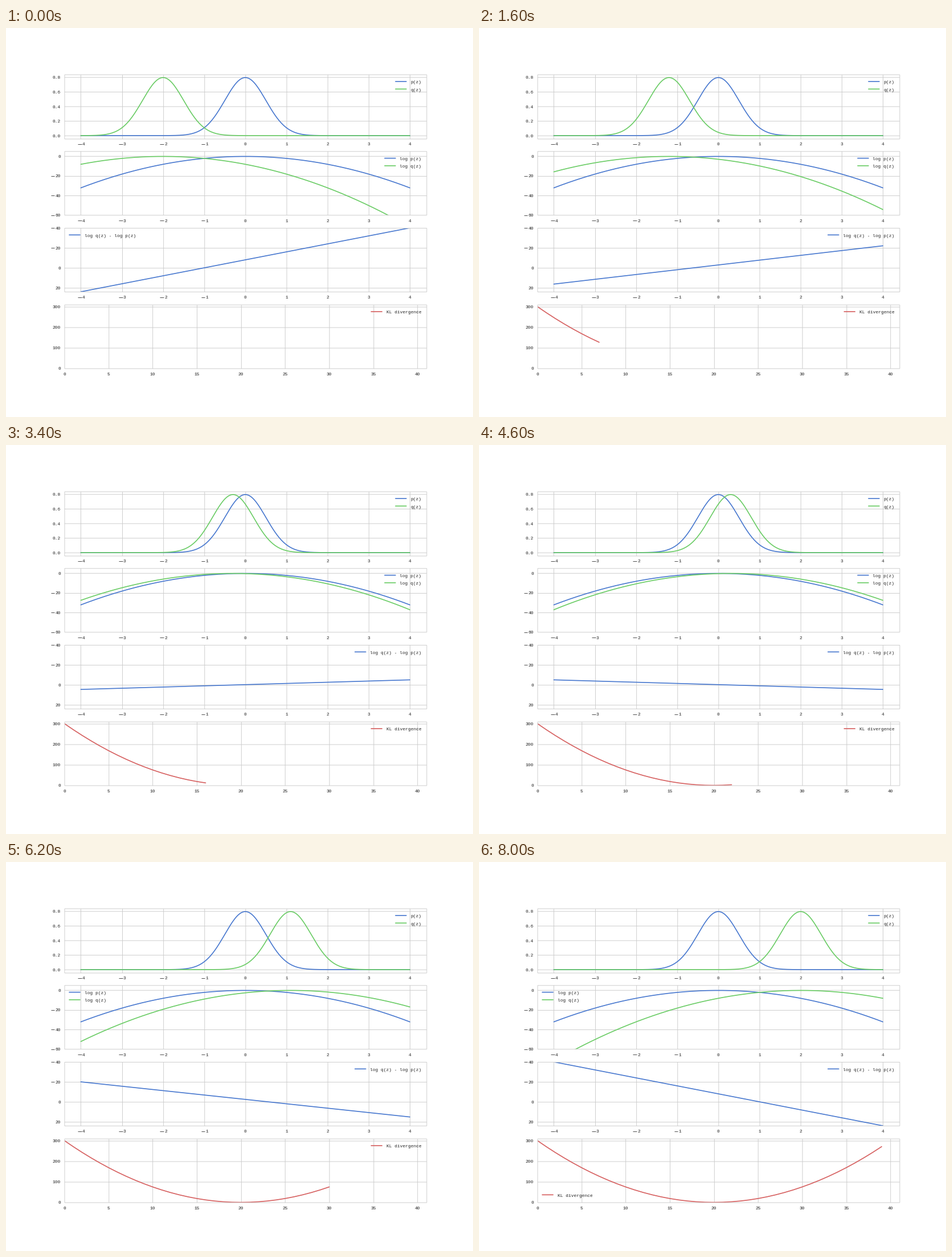
A matplotlib script that plays this animation: 820x683 px, repeating every 8.2 s.

```python
import numpy as np
import matplotlib.pyplot as plt
from matplotlib.animation import FuncAnimation
from matplotlib.lines import Line2D
from matplotlib.transforms import Affine2D

STAGE_W, STAGE_H, DPI = 820, 683, 64
# Layout units: a 12 x 10 inch page at 72 units per inch, y pointing down.
W, H = 864, 720
UNIT = STAGE_W / W * 72 / DPI      # points per layout unit
EM, CHAR = 10, 5                   # type size and character width
LEFT, RIGHT, TOP = 0.125 * W, 0.9 * W, 0.12 * H
PANEL = 0.755 * H / 4.6            # panel height; gaps are 20 % of it
BLUE, GREEN, RED = "#4878CF", "#6ACC65", "#D65F5F"
INK, GRID = "0.15", "0.8"
STEPS, INTERVAL = 41, 200
SIGMA = 0.5

plt.rcParams.update({
    "font.family": "Liberation Mono",
    "font.size": CHAR / 0.6 * UNIT,
    "text.color": INK,
    "lines.linewidth": 1.75 * UNIT,
    "lines.solid_capstyle": "round",
})

fig = plt.figure(figsize=(STAGE_W / DPI, STAGE_H / DPI), dpi=DPI,
                 facecolor="white")
page = Affine2D().scale(1 / W, -1 / H).translate(0, 1) + fig.transFigure


def text(x, y, s):
    return fig.text(x, y, s, transform=page, ha="left", va="baseline")


def stroke(x0, x1, y, **style):
    return fig.add_artist(Line2D([x0, x1], [y, y], transform=page, **style))


def number(x, y, value, fmt, align):
    """Tick label with a full-width minus; align is the share left of x."""
    digits = format(abs(value), fmt)
    sign = EM if value < 0 else 0
    x -= align * (sign + CHAR * len(digits))
    if sign:
        stroke(x + 0.18 * EM, x + 0.88 * EM, y - 2.8, color=INK,
               lw=0.85 * UNIT, solid_capstyle="butt")
    text(x + sign, y, digits)


def panel_top(row):
    return TOP + 1.2 * PANEL * row


def snap(v):
    return np.floor(v + 0.5) + 0.5


def rules(ax, places, edges, span, vertical):
    """Grid lines below the curves, frame lines above them."""
    edges = {snap(v) for v in edges}
    for v in {snap(v) for v in places} | edges:
        xy = ([v, v], span) if vertical else (span, [v, v])
        ax.add_artist(Line2D(*xy, transform=page, color=GRID, lw=UNIT,
                             snap=False, solid_capstyle="butt", clip_on=False,
                             zorder=2.5 if v in edges else 0.5))


def panel(row, xlim, ylim, xticks, yticks, fmt="d"):
    top = panel_top(row)
    bottom = top + PANEL
    ax = fig.add_axes([LEFT / W, 1 - bottom / H, (RIGHT - LEFT) / W, PANEL / H])
    ax.set(xlim=xlim, ylim=ylim)
    ax.set_axis_off()
    xs = [LEFT + (RIGHT - LEFT) * (v - xlim[0]) / (xlim[1] - xlim[0])
          for v in xticks]
    ys = [bottom - PANEL * (v - ylim[0]) / (ylim[1] - ylim[0]) for v in yticks]
    rules(ax, xs, (LEFT, RIGHT), (snap(top), snap(bottom)), True)
    rules(ax, ys, (top, bottom), (snap(LEFT), snap(RIGHT)), False)
    for x, v in zip(xs, xticks):
        number(x, bottom + 12.8, v, "d", 0.5)
    for y, v in zip(ys, yticks):
        number(LEFT - 7, y + 2.8, v, fmt, 1)
    return ax


def legend(row, entries, left=False, low=False):
    parts = []
    for k, (label, color) in enumerate(entries):
        y = round(panel_top(row) + (PANEL - 14.1 if low else 12.9 + 14 * k))
        x = LEFT + 37 if left else RIGHT - 9 - CHAR * len(label)
        parts.append(stroke(x - 28, x - 8, y, color=color, snap=False))
        parts.append(text(x, y + 3.5, label))
    return parts


def show(parts, on):
    for part in parts:
        part.set_visible(on)


def log_pdf(z, mu):
    return -0.5 * ((z - mu) / SIGMA) ** 2 - np.log(SIGMA * np.sqrt(2 * np.pi))


def kl_sum(mu):
    log_q = log_pdf(z, mu)
    return np.sum(np.exp(log_q) * (log_q - log_p))


z = np.linspace(-4, 4, 301)
log_p = log_pdf(z, 0)
means = -2 + 0.1 * np.arange(STEPS)
kl = [kl_sum(mu) for mu in means]

peak = np.exp(log_p).max()
zlim, zticks = (-4.4, 4.4), range(-4, 5)
ax_pdf = panel(0, zlim, (-0.05 * peak, 1.05 * peak), zticks,
               [0.0, 0.2, 0.4, 0.6, 0.8], ".1f")
ax_log = panel(1, zlim, (-60, 5), zticks, range(-60, 1, 20))
ax_diff = panel(2, zlim, (24, -40), zticks, range(-40, 21, 20))
ax_kl = panel(3, (0, 41), (0, 310), range(0, 41, 5), range(0, 301, 100))

ax_pdf.plot(z, np.exp(log_p), color=BLUE)
ax_log.plot(z, log_p, color=BLUE)
pdf_line, = ax_pdf.plot([], [], color=GREEN)
log_line, = ax_log.plot([], [], color=GREEN)
diff_line, = ax_diff.plot([], [], color=BLUE)
kl_line, = ax_kl.plot([], [], color=RED)

logs = [("log p(z)", BLUE), ("log q(z)", GREEN)]
diff = [("log q(z) - log p(z)", BLUE)]
div = [("KL divergence", RED)]
legend(0, [("p(z)", BLUE), ("q(z)", GREEN)])
# Legends step aside for the curves: (step, before, after)
jumps = [
    (27, legend(1, logs), legend(1, logs, left=True)),
    (6, legend(2, diff, left=True), legend(2, diff)),
    (40, legend(3, div), legend(3, div, left=True, low=True)),
]


def update(i):
    log_q = log_pdf(z, means[i])
    pdf_line.set_data(z, np.exp(log_q))
    log_line.set_data(z, log_q)
    diff_line.set_data(z, log_q - log_p)
    kl_line.set_data(range(i), kl[:i])
    for step, before, after in jumps:
        show(before, i < step)
        show(after, i >= step)
    return []


anim = FuncAnimation(fig, update, frames=STEPS, interval=INTERVAL,
                     init_func=lambda: update(0), repeat=True, repeat_delay=0)
plt.show()
```
